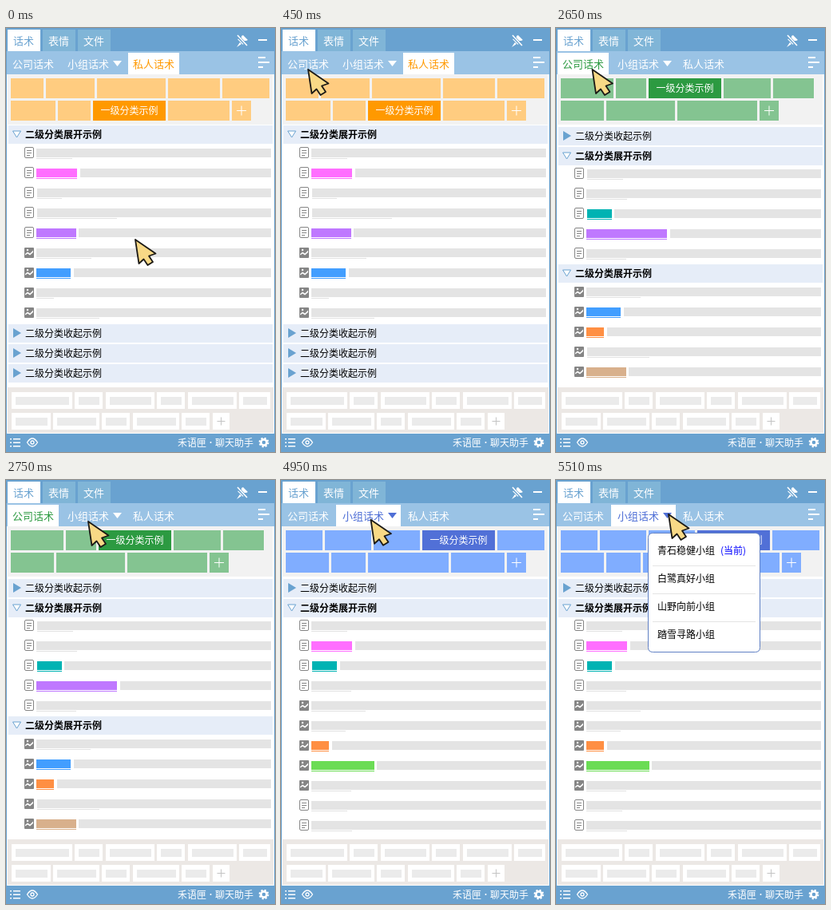
Write an HTML page that moves like this. It is 337 by 531 pixels and loops after 8 s.

```html
<!DOCTYPE html>
<html lang="zh-CN">
<head>
<meta charset="utf-8">
<style>
html, body { margin: 0; width: 100%; height: 100%; overflow: hidden; background: #fff; }
svg { display: block; width: 337px; height: 531px; }
text { font-family: "Noto Sans CJK SC", "Noto Sans CJK", sans-serif; white-space: pre; }
</style>
</head>
<body>
<svg id="stage" viewBox="0 0 337 531"></svg>
<script>
const BLUE = '#69a2d0', GREY = '#e4e4e4', ICON = '#858585';
const PINK = '#ff6eff', PURPLE = '#bf78ff', SKY = '#429eff', TEAL = '#00b3b3',
      ORANGE = '#ff8f43', TAN = '#d8b08c', LIME = '#6bdc55';

// Boxes are given by their left, top, right and bottom edges
const box = (x, y, r, b, fill) =>
  `<rect x="${x}" y="${y}" width="${r - x}" height="${b - y}" fill="${fill}"/>`;
const path = (d, fill = 'none', stroke = 'none', width = 1) =>
  `<path d="${d}" fill="${fill}" stroke="${stroke}" stroke-width="${width}"/>`;
const text = (s, x, mid, fill = '#000', size = 12, weight = 400) =>
  `<text x="${x}" y="${mid + size * 0.375}" fill="${fill}" font-size="${size}" font-weight="${weight}">${s}</text>`;
const plus = (x, y, r, color) =>
  box(x - r, y - .5, x + r, y + .5, color) + box(x - .5, y - r, x + .5, y + r, color);

const docIcon = c =>
  `<rect x="23.5" y="${c - 6.5}" width="11" height="13" rx="1.5" fill="#fff" stroke="${ICON}"/>` +
  path(`M26 ${c - 2.5}h6M26 ${c + .5}h6M26 ${c + 3.5}h4`, 'none', ICON);
const imageIcon = c =>
  `<rect x="23" y="${c - 6}" width="12" height="13" rx="1" fill="${ICON}"/>` +
  path(`M24 ${c + 2}l3-2.5 3 2 4-4v2.5l-4 3.5-3-2-3 2z`, '#fff') +
  `<circle cx="27" cy="${c - 3}" r="1.2" fill="#fff"/>`;

// Item: [icon, left, right, colour, start of the remaining bar]
function item([kind, x, r, color, rest], c) {
  const icon = kind === 'd' ? docIcon(c) : imageIcon(c);
  if (!color) return icon + box(x, c - 5, 332, c + 6, GREY) + box(x, c + 7, r, c + 8, '#e2e2e2');
  return icon + box(x, c - 5, r, c + 6, color) + box(x, c + 7, r, c + 8, color) +
    box(rest, c - 5, 332, c + 6, GREY);
}
const items = (list, first) => list.map((row, i) => item(row, first + i * 25)).join('');

function header(c, open) {
  const mark = open
    ? path(`M8.5 ${c - 4}h10l-5 8z`, '#fff', BLUE)
    : path(`M9 ${c - 6}l10 6-10 6z`, BLUE);
  return box(3, c - 11, 334, c + 12, '#e6edf8') + mark +
    text(open ? '二级分类展开示例' : '二级分类收起示例', 24, c, '#000', 12, open ? 700 : 400);
}

// Chip rows hold [left, right]; the active chip and the plus chip carry a flag
function chips(rows, light, dark) {
  return rows.map((row, i) => row.map(([x, r, flag]) => {
    const y = 63 + i * 28;
    return box(x, y, r, y + 25, flag === 'on' ? dark : light) +
      (flag === 'on' ? text('一级分类示例', (x + r) / 2 - 36, y + 12.5, '#fff') : '') +
      (flag === '+' ? plus((x + r) / 2, y + 12.5, 6, '#fff') : '');
  }).join('')).join('');
}

const TABS = [['公司话术', 8, 2, 66], ['小组话术', 77, 69, 150], ['私人话术', 159, 153, 217]];
function tabs(active, color) {
  return TABS.map(([name, x, left, right], i) => {
    const ink = i === active ? color : '#fff';
    return (i === active ? box(left, 31, right, 58, '#fff') : '') + text(name, x, 45, ink, 13) +
      (i === 1 ? path('M134 41h11l-5.5 7z', ink) : '');
  }).join('');
}

const scenes = [
  tabs(2, '#ff9900') +
  chips([[[6, 47], [50, 111], [114, 200], [203, 268], [271, 330]],
         [[6, 62], [65, 106], [109, 200, 'on'], [203, 280], [283, 307, '+']]], '#ffcc80', '#ff9900') +
  header(133, true) +
  items([['d', 38, 83], ['d', 38, 89, PINK, 93], ['d', 39, 70], ['d', 39, 139], ['d', 38, 88, PURPLE, 91],
         ['i', 38, 107], ['i', 38, 81, SKY, 85], ['i', 38, 60], ['i', 38, 117]], 156) +
  header(382) + header(407) + header(432),

  tabs(0, '#2c9a41') +
  chips([[[6, 72], [75, 113], [116, 207, 'on'], [210, 269], [272, 323]],
         [[6, 60], [63, 149], [152, 252], [255, 279, '+']]], '#84c491', '#2c9a41') +
  header(135) + header(160, true) +
  items([['d', 39, 84], ['d', 38, 89], ['d', 39, 70, TEAL, 73], ['d', 38, 139, PURPLE, 143], ['d', 38, 88]], 182) +
  header(307, true) +
  items([['i', 38, 106], ['i', 38, 81, SKY, 85], ['i', 38, 60, ORANGE, 64], ['i', 39, 117], ['i', 38, 88, TAN, 91]], 330),

  tabs(1, '#4f6fd6') +
  chips([[[6, 52], [55, 113], [116, 174], [177, 268, 'on'], [271, 330]],
         [[6, 60], [63, 106], [109, 210], [213, 280], [283, 307, '+']]], '#80adff', '#5170d7') +
  header(135) + header(160, true) +
  items([['d', 38, 83], ['d', 38, 89, PINK, 93], ['d', 39, 70, TEAL, 74], ['d', 38, 88], ['i', 38, 106], ['i', 38, 81],
         ['i', 38, 60, ORANGE, 64], ['i', 38, 117, LIME, 120], ['i', 38, 88], ['d', 38, 83], ['d', 38, 89]], 182)
];

const cells = [[[7, 83], [86, 121], [125, 186], [189, 224], [228, 289], [292, 331]],
               [[7, 56], [59, 117], [120, 155], [159, 217], [220, 255], [259, 280]]];
const footer = cells.map((row, i) => row.map(([x, r]) => {
  const y = 456 + i * 26;
  return box(x, y, r, y + 21, '#fff') +
    (x === 259 ? plus(269.5, y + 10.5, 5, '#c4c4c4') : box(x + 5, y + 6, r - 4, y + 16, '#ebebeb'));
}).join('')).join('');

const frame =
  box(0, 0, 337, 531, BLUE) + box(1, 58, 336, 508, '#fff') +
  box(2, 2, 43, 29, '#fff') + box(46, 2, 87, 29, '#80b5d7') + box(90, 2, 131, 29, '#80b5d7') +
  text('话术', 9, 16, BLUE, 13) + text('表情', 53, 16, '#fff', 13) + text('文件', 97, 16, '#fff', 13) +
  path('M297 9l6 6-2 1-2 0-2 5-7-7 5-2 0-2zM293 18l2 2-6 4z', '#fff') +
  path('M289 9l13 13', 'none', BLUE, 3.5) + path('M290 9l12 13', 'none', '#fff', 1.5) +
  box(316, 14, 327, 16, '#fff') +
  box(1, 29, 336, 58, '#9ac3e5') +
  box(316, 36, 325, 38, '#fff') + box(316, 42, 330, 44, '#fff') + box(316, 48, 322, 50, '#fff') +
  box(2, 58, 334, 121, '#f2f2f2') + box(2, 450, 335, 507, '#ece8e5') + footer +
  [514, 518.5, 523].map(y => box(5, y, 7, y + 1.5, '#fff') + box(9, y, 18, y + 1.5, '#fff')).join('') +
  path('M26.5 519q6.5-10 13 0q-6.5 10-13 0z', 'none', '#fff', 1.3) +
  '<circle cx="33" cy="519" r="2" fill="none" stroke="#fff" stroke-width="1.3"/>' +
  text('禾语匣', 215, 519, '#fff') + '<circle cx="256.5" cy="519" r="1" fill="#fff"/>' +
  text('聊天助手', 262, 519, '#fff') +
  '<circle cx="323" cy="519" r="3.6" fill="none" stroke="#fff" stroke-width="2.6"/>' +
  '<circle cx="323" cy="519" r="5.4" fill="none" stroke="#fff" stroke-width="2" stroke-dasharray="2.2 2.04"/>';

const menu =
  path('M121.5 66.5H143l5-12 5 12h96.500q6 0 6 6v137q0 6-6 6h-128q-6 0-6-6v-137q0-6 6-6z', '#fff', '#6080c4') +
  ['青石稳健小组', '白鹭真好小组', '山野向前小组', '踏雪寻路小组'].map((name, i) =>
    text(name, 127, 88 + i * 35) + (i ? box(121, 72 + i * 35, 250, 73 + i * 35, GREY) : '')).join('') +
  text('(当前)', 206, 88, '#0000ff');

const stage = document.getElementById('stage');
stage.innerHTML = frame + scenes.map(s => `<g class="scene">${s}</g>`).join('') +
  `<g id="menu">${menu}</g>` +
  '<path id="cursor" d="M0 0L25.500 17.500 17 20.500 22 28 15.500 32 10.500 24.500 4.500 30z" ' +
  'fill="#f8d986" stroke="#1c1a16" stroke-width="1.8" stroke-linejoin="round"/>';

const groups = [...stage.querySelectorAll('.scene')];
const popup = document.getElementById('menu');
const cursor = document.getElementById('cursor');

// Cursor moves in even jumps: start, interval, number of jumps, destination
const moves = [[200, 50, 6, 34, 52], [2650, 20, 6, 103, 52], [4950, 20, 4, 141, 43]];

function draw() {
  const t = performance.now() % 8000;
  const current = t < 650 ? 0 : t < 2950 ? 1 : 2;
  groups.forEach((g, i) => g.style.display = i === current ? '' : 'none');
  popup.style.display = t < 5510 ? 'none' : '';

  let x = 162, y = 265;
  for (const [start, gap, count, toX, toY] of moves) {
    if (t < start) break;
    const p = Math.min(1, (Math.floor((t - start) / gap) + 1) / count);
    x += (toX - x) * p;
    y += (toY - y) * p;
  }
  cursor.setAttribute('transform', `translate(${x} ${y})`);
  requestAnimationFrame(draw);
}
draw();
</script>
</body>
</html>
```
